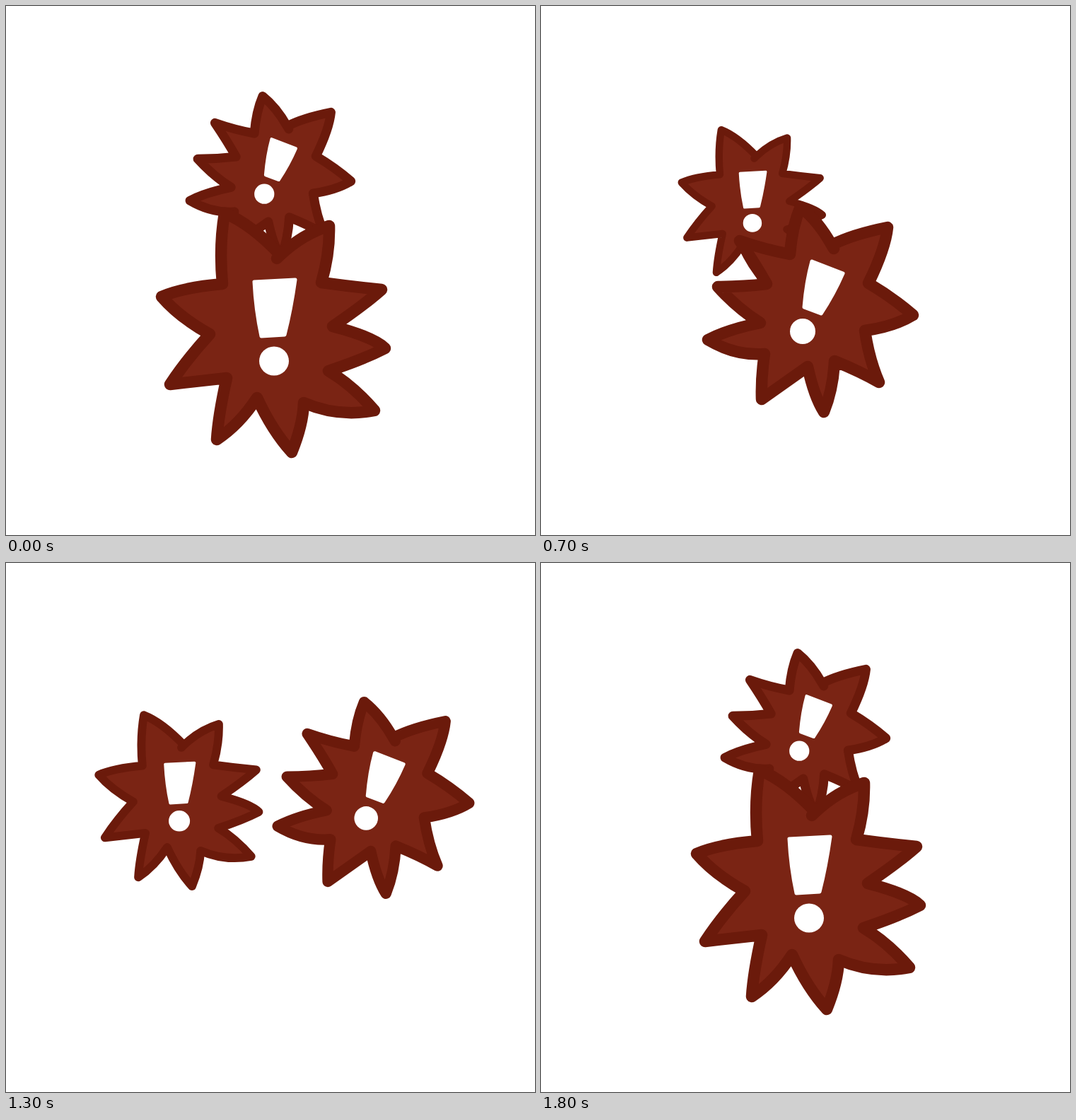
These frames come from a looping animation (748 px wide and 748 px high, 1.9 s). An HTML page:

```html
<!DOCTYPE html>
<html lang="en">
<head>
<meta charset="utf-8">
<title>Orbiting bursts</title>
<style>
  html, body { margin: 0; width: 100%; height: 100%; overflow: hidden; background: #fff; }
  svg { display: block; width: 100vw; height: 100vh; }
  .burst { fill: #7a2414; stroke: #6b1a0b; stroke-width: 16.5; }
  .mark { fill: #fff; stroke: #fff; stroke-width: 5; }
  path { stroke-linejoin: round; stroke-linecap: round; }
</style>
</head>
<body>
<svg viewBox="0 0 748 748">
  <g id="upright">
    <path class="burst" d="M309 293Q345 307 388 352Q420 322 457 311Q458 350 446 391Q490 397 531 401
      Q505 424 462 453Q520 468 536 484Q505 500 456 516Q490 536 521 572Q470 582 421 561
      Q420 592 404 631Q376 600 355 554Q330 592 298 613Q300 580 312 526L232 535
      Q255 500 288 464Q245 440 220 411Q250 398 306 393Q301 340 309 293ZM388 352L383 357"/>
    <path class="mark" d="M351 390L409 387Q403 430 394 465L361 467Q353 430 351 390Z"/>
    <ellipse cx="379" cy="502" rx="21" ry="20.5" fill="#fff"/>
  </g>
  <g id="tilted">
    <path class="burst" d="M367 284Q392 304 411 338Q440 323 490 313Q487 343 463 392Q497 412 526 437
      Q500 453 458 459Q464 500 478 532Q452 517 415 502Q413 542 400 574Q386 552 377 510
      L312 556Q311 525 316 492Q275 495 236 472Q265 457 310 448Q278 428 250 397
      Q285 397 319 393Q304 366 281 332Q315 344 352 351Q355 312 367 284ZM411 338L414 343"/>
    <path class="mark" d="M383 361L427 378Q414 408 396 435L372 426Q375 390 383 361Z"/>
    <circle cx="370" cy="460" r="18" fill="#fff"/>
  </g>
</svg>
<script>
  const STEP = 100, COUNT = 19, TURN = 9;
  const svg = document.querySelector("svg");
  const upright = document.getElementById("upright");
  const tilted = document.getElementById("tilted");

  // Key poses: step, centre x, centre y, scale
  const uprightKeys = [
    [0, 377.5, 462.5, 1], [3, 264, 383.5, .805], [4, 237, 360, .76], [5, 244, 336.5, .716],
    [6, 263, 309, .673], [7, 298, 282, .63], [9, 375, 248, .56]
  ];
  const tiltedKeys = [
    [0, 373.5, 241], [3, 476.5, 268.5], [4, 507, 297], [5, 519, 331.5],
    [6, 470, 380], [7, 380.5, 428.5], [9, 350, 421]
  ];

  // Smooth curve through the keys
  function spline(keys, u, c) {
    const last = keys.length - 1;
    let i = 0;
    while (i < last - 1 && u >= keys[i + 1][0]) i++;
    const slope = j => {
      const a = keys[Math.max(j - 1, 0)], b = keys[Math.min(j + 1, last)];
      return (b[c] - a[c]) / (b[0] - a[0]);
    };
    const a = keys[i], b = keys[i + 1], h = b[0] - a[0];
    const p = (u - a[0]) / h, q = 1 - p;
    return q * q * (1 + 2 * p) * a[c] + p * p * (3 - 2 * p) * b[c]
      + h * p * q * (q * slope(i) - p * slope(i + 1));
  }

  function place(el, x, y, s, cx, cy) {
    el.setAttribute("transform", `translate(${x} ${y}) scale(${s}) translate(${-cx} ${-cy})`);
  }

  let shown = -1;
  function draw(time) {
    const k = Math.floor(time / STEP) % COUNT;
    if (k !== shown) {
      shown = k;
      const u = TURN - Math.abs(TURN - k);
      place(upright, spline(uprightKeys, u, 1), spline(uprightKeys, u, 2),
        spline(uprightKeys, u, 3), 377.5, 462.5);
      place(tilted, spline(tiltedKeys, u, 1), spline(tiltedKeys, u, 2),
        Math.exp(.0346 * (u - 7)), 380.5, 428.5);
      svg.appendChild(u < 5 ? upright : tilted);
    }
  }

  const start = performance.now();
  function tick() {
    draw(performance.now() - start);
    requestAnimationFrame(tick);
  }
  tick();
</script>
</body>
</html>
```
